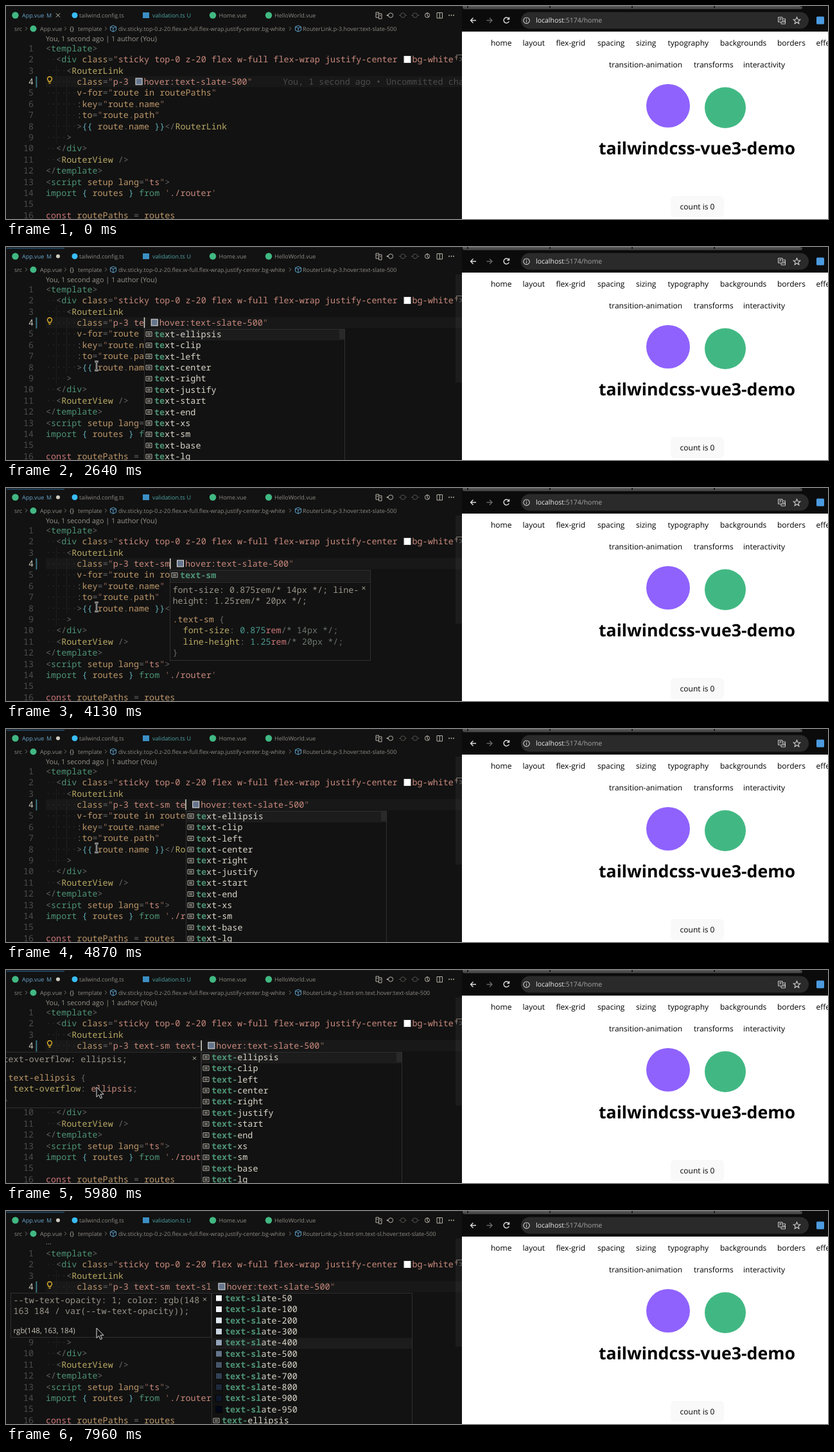
Animation of 1280x333 px, one loop 8000 ms. Source, as an HTML page:

```html
<!DOCTYPE html>
<html lang="en">
<head>
<meta charset="utf-8">
<title>Editor and browser</title>
<style>
html,body{margin:0;width:100%;height:100%;overflow:hidden;background:#121212}
svg{display:block;width:1280px;height:333px}
text{white-space:pre;text-rendering:geometricPrecision}
.m{font-family:"Noto Sans Mono","DejaVu Sans Mono",monospace;font-size:13.43px}
.u{font-family:"Open Sans","Noto Sans",sans-serif}
</style>
</head>
<body>
<svg viewBox="0 0 1280 333">
<g id="editor"></g><g id="edit"></g><g id="popup"></g><g id="mouse"></g><g id="browser"></g>
</svg>
<script>
const LOOP = 8000, CW = 8.06, LH = 17.4, X0 = 62, SPLIT = 710;
const $ = id => document.getElementById(id);
const INK = {p: '#666666', g: '#4d9375', o: '#bd976a', y: '#b8a965', s: '#c98a7d', q: '#8f6659',
  t: '#5eaab5', r: '#cb7676', w: '#dbd7ca', c: '#69736c', n: '#4c9a91', d: '#999489', h: '#4b4b4b'};
const esc = s => s.replace(/&/g, '&amp;').replace(/</g, '&lt;').replace(/>/g, '&gt;');
const row = n => 70.7 + (n - 1) * LH;
const col = n => X0 + n * CW;

const rect = (x, y, w, h, fill, more = '') =>
  `<rect x="${x}" y="${y}" width="${w}" height="${h}" fill="${fill}" ${more}/>`;
const dot = (x, y, r, fill, more = '') => `<circle cx="${x}" cy="${y}" r="${r}" fill="${fill}" ${more}/>`;
const line = (d, stroke, w = 1, more = '') => `<path d="${d}" fill="none" stroke="${stroke}" stroke-width="${w}" ${more}/>`;
const ui = (x, y, s, size, fill, more = '') =>
  `<text class="u" x="${x}" y="${y}" font-size="${size}" fill="${fill}" ${more}>${esc(s)}</text>`;
// Marked-up code: "~" followed by a colour letter starts a run; capitals are bold.
const code = (x, y, src, more = '') => `<text class="m" x="${x}" y="${y}" ${more}>` +
  src.split('~').slice(1).map(t => {
    const k = t[0].toLowerCase(), bold = k !== t[0] ? ' font-weight="700"' : '';
    return `<tspan fill="${INK[k]}"${bold}>${esc(t.slice(1))}</tspan>`;
  }).join('') + '</text>';
const swatch = (x, y, fill, edge = '#e6e6e6') =>
  rect(x + .5, y + .5, 10, 10, fill, `stroke="${edge}" stroke-width="1"`);
const cross = (x, y, r, c) => line(`M${x - r} ${y - r}l${2 * r} ${2 * r}m0 ${-2 * r}l${-2 * r} ${2 * r}`, c);

const LINES = [
  [0, '~p<~gtemplate~p>'],
  [2, '~p<~gdiv ~oclass~p=~q"~ssticky top-0 z-20 flex w-full flex-wrap justify-center'],
  [4, '~p<~yRouterLink'],
  [6, ''],
  [6, '~ov-for~p=~q"~oroute in routePaths~q"'],
  [6, '~p:~okey~p=~q"~oroute~p.~oname~q"'],
  [6, '~p:~oto~p=~q"~oroute~p.~opath~q"'],
  [6, '~p>~t{{ ~oroute~p.~oname ~t}}~p</~yRouterLink'],
  [4, '~p>'],
  [2, '~p</~gdiv~p>'],
  [2, '~p<~yRouterView ~p/>'],
  [0, '~p</~gtemplate~p>'],
  [0, '~p<~gscript ~osetup lang~p=~q"~sts~q"~p>'],
  [0, "~gimport ~t{ ~oroutes ~t} ~gfrom ~q'~s./router~q'"],
  [0, ''],
  [0, '~rconst ~oroutePaths ~p= ~oroutes']
];

function drawEditor() {
  const gray = '#8d8a82', vue = '#41b883';
  let s = rect(0, 0, SPLIT, 333, '#121212') + rect(0, 0, SPLIT, 1, '#1d1d1d');
  s += dot(14.5, 14.5, 5.2, vue) + ui(25, 18, 'App.vue', 9, '#6aa5cc') + ui(63, 18, 'M', 9, '#6aa5cc');
  s += dot(107, 14.5, 4.5, '#38bdf8') + ui(114, 18, 'tailwind.config.ts', 8.9, gray);
  s += rect(213, 10, 10, 9, '#3b8fc4') + ui(228, 18, 'validation.ts', 9, '#4fa3a5') + ui(281.5, 18, 'U', 9, '#4fa3a5');
  s += dot(322, 14.5, 5.2, vue) + ui(331.5, 18, 'Home.vue', 9, gray);
  s += dot(409, 14.5, 5.2, vue) + ui(418, 18, 'HelloWorld.vue', 9, gray);

  const ic = '#b9b5aa', dim = '#55534f';
  s += line('M576 10h4.500v8h-4.500zM580.500 12h4.500v8h-4.500zM577 13h2M582 15h2', ic);
  [[599, ic], [618, dim], [637, dim], [656, ic]].forEach(([x, c]) => s += `<circle cx="${x}" cy="14.500" r="3.600" fill="none" stroke="${c}"/>`);
  s += line('M593 14.500h2.500m-1-1.500l-1.500 1.500l1.500 1.500', ic) + line('M612 14.500h2.500M622 14.500h2M631 14.500h2.500M641 14.500h2.500', dim);
  s += line('M656 10v5l2.500 2', ic) + line('M671 10.500h8.500v8.500h-8.500zM675.300 10.500v8.500', ic);
  [690, 693.5, 697].forEach(x => s += dot(x, 14.5, 1, ic));

  s += ui(13, 38.6, 'src', 9, gray) + dot(42.5, 35.5, 5, vue) + ui(53, 38.6, 'App.vue', 9, gray);
  s += ui(99, 38.6, '{}', 9.5, '#b9b5aa') + ui(112, 38.6, 'template', 9, gray);
  s += ui(175, 38.6, 'div.sticky.top-0.z-20.flex.w-full.flex-wrap.justify-center.bg-white', 8.95, gray);
  [30, 91, 154, 441].forEach(x => s += line(`M${x} 32.500l2.800 2.800l-2.800 2.800`, '#77746d'));
  [167, 455].forEach(x => s += line(`M${x} 30.500l4.500 2v5.500l-4.500 2.200l-4.500-2.200v-5.500zm-4.500 2l4.500 2l4.500-2M${x} 34.500v5.500`, '#5b9fc9'));

  s += rect(X0, 109.6, SPLIT - X0, LH, '#181818');
  s += line('M94.500 110v87', '#202020') + line('M78.500 92.500v122', '#1d1d1d');
  s += rect(46.5, 110, 1.8, 17.4, '#3d7f8c');
  LINES.forEach(([indent, src], i) => {
    const y = row(i + 1);
    s += `<text class="m" x="43" y="${y}" text-anchor="end" fill="${i === 3 ? '#c8c4b8' : '#4c4c4c'}">${i + 1}</text>`;
    for (let c = 0; c < indent; c++) s += dot(col(c + .5), y - 4.5, .7, '#3c3c3c');
    if (src) s += code(col(indent), y, src);
  });
  s += swatch(619.5, 78, '#fff') + code(632.5, row(2), '~sbg-white~q"~p>');
  s += line('M701.500 85v-8.500h9', '#77746d');
  $('editor').innerHTML = s;
}

function drawBrowser() {
  let s = rect(SPLIT, 0, 570, 333, '#fff') + rect(SPLIT, 0, 570, 40, '#0b0b0b');
  s += rect(711, 0, 529, 5, '#454545', 'rx="3"') + rect(711, 0, 525, 2, '#5a5a5a');
  [718, 846, 974, 1102].forEach(x => s += rect(x, 0, 2, 3, '#1a1a1a'));
  s += rect(802, 9.5, 448, 26, '#2a2a2a', 'rx="13"');
  s += line('M732 22.500h-8.500m4-4l-4 4l4 4', '#dedede', 1.4) + line('M748.500 22.500h8.500m-4-4l4 4l-4 4', '#686868', 1.4);
  s += line('M783 20a4.300 4.300 0 1 0 .3 4M783.500 17.500v3.200h-3.200', '#dedede', 1.4);
  s += line('M810.500 18a4.700 4.700 0 1 0 .1 0M810.500 22v3.200M810.500 19.800v1.200', '#c9c9c9', 1.1);
  s += '<text class="u" x="825" y="26.300" font-size="10.500" fill="#f0f0f0">localhost<tspan fill="#a8a8a8">:5174/home</tspan></text>';
  s += line('M1202.500 17.500h6.500v7.500h-6.500zM1209 20h4.500v8h-6.500v-3M1204 20h3.500M1205.800 19v1c0 2-1 3-2 3.500M1210 26l1.500-4l1.500 4', '#c9c9c9');
  s += line('M1231.500 17.500l1.500 3.500l3.800.300l-2.900 2.500l.9 3.700l-3.300-2l-3.300 2l.9-3.700l-2.900-2.500l3.800-.300z', '#d5d5d5', 1.1);
  s += rect(1262, 16.5, 12, 12, '#4c9be0', 'rx="1.5"');
  const nav = {home: 755, layout: 804.5, 'flex-grid': 856.5, spacing: 921, sizing: 981, typography: 1030.5, backgrounds: 1112, borders: 1201, effects: 1261.5};
  for (const k in nav) s += ui(nav[k], 61.8, k, 12, '#000');
  s += ui(939, 96.3, 'transition-animation', 12, '#000') + ui(1071, 96.3, 'transforms', 12, '#000') + ui(1148, 96.3, 'interactivity', 12, '#000');
  s += dot(1031, 156, 34, '#8f62fd') + dot(1120, 159, 32, '#41b883');
  s += ui(1076, 232, 'tailwindcss-vue3-demo', 26.7, '#000', 'font-weight="700" text-anchor="middle"');
  s += rect(1035, 297, 83, 33, '#f9f9f9', 'rx="6"') + ui(1076.5, 317.5, 'count is 0', 12, '#000', 'text-anchor="middle"');
  $('browser').innerHTML = s;
}

const TYPED = [[0, ''], [2290, ' '], [2470, ' t'], [2640, ' te'], [3000, ' tex'], [3230, ' text'], [3660, ' text-'],
  [4130, ' text-sm'], [4510, ' text-sm '], [4870, ' text-sm te'], [5070, ' text-sm tex'], [5260, ' text-sm text'],
  [5980, ' text-sm text-'], [6210, ' text-sm text-s'], [6450, ' text-sm text-sl']];
const PICKED = [[0, 0], [6960, 1], [7130, 2], [7480, 3], [7820, 4]];
const at = (list, t) => list.filter(e => e[0] <= t).pop()[1];

const TEXT = 'ellipsis clip left center right justify start end xs sm base lg'.split(' ').map(s => 'text-' + s);
const SHADES = {50: '248 250 252', 100: '241 245 249', 200: '226 232 240', 300: '203 213 225', 400: '148 163 184',
  500: '100 116 139', 600: '71 85 105', 700: '51 65 85', 800: '30 41 59', 900: '15 23 42', 950: '2 6 23'};
const SLATE = Object.keys(SHADES).map(k => 'text-slate-' + k);
const ANY = 'sr-only not-sr-only pointer-events-none pointer-events-auto visible invisible collapse static fixed absolute relative sticky'.split(' ');
const TABLE = 'table table-caption table-cell table-column table-column-group table-footer-group table-header-group table-row table-row-group table-auto table-fixed touch-auto'.split(' ');

function options(word) {
  if (word === '') return ANY;
  if (word === 't') return TABLE;
  if (word === 'text-sm') return ['text-sm'];
  if (word === 'text-s') return ['text-start', 'text-sm', ...SLATE].slice(0, 12);
  if (word === 'text-sl') return [...SLATE, 'text-ellipsis'];
  return TEXT;
}

const frame = (x, y, w, h) => rect(x + .5, y + .5, w - 1, h, '#121212', 'stroke="#303030"');

function listBox(x, word, picked) {
  const items = options(word), one = items.length === 1;
  let s = frame(x, 128, 313, one ? 19 : 220);
  s += rect(x + 1, 129 + picked * LH, 311, 17, '#1c1c1c');
  if (items === TEXT) s += rect(x + 304, 129, 8, 15, '#292929');
  items.forEach((name, i) => {
    const y = 140.7 + i * LH, shade = SHADES[name.split('slate-')[1]];
    if (shade) s += swatch(x + 6, y - 10, `rgb(${shade.replace(/ /g, ',')})`, '#050505');
    else s += line(`M${x + 3} ${y - 8}h9v7h-9zm2 2.500h5m-5 2h5`, '#b9b5aa', 1, 'stroke-linejoin="round"');
    let n = 0;
    while (n < word.length && name[n] === word[n]) n++;
    s += code(x + (shade ? 21 : 16), y, `~G${name.slice(0, n)}~w${name.slice(n)}`);
  });
  return s;
}

function docBox(x, word, picked) {
  if (word === 'text-sm') {
    const size = (k, v, px) => `~y  ${k}~p: ~n${v}~rrem~c/* ${px}px */~p;`;
    return frame(x, 147, 313, 122) + cross(x + 302, 156.5, 2.4, '#c8c4b8') +
      code(x + 4.5, 163.5, '~dfont-size: 0.875rem/* 14px */; line-') + code(x + 4.5, 180.9, '~dheight: 1.25rem/* 20px */;') +
      code(x + 4.5, 209.7, '~o.text-sm ~p{') + code(x + 4.5, 227.1, size('font-size', '0.875', 14)) +
      code(x + 4.5, 244.5, size('line-height', '1.25', 20)) + code(x + 4.5, 261.9, '~p}');
  }
  const left = x - 313, tx = left + 4.5, close = cross(x - 10.5, 138, 2.4, '#c8c4b8');
  if (word === 'text-sl') {
    const rgb = Object.values(SHADES)[picked].split(' ');
    return frame(left, 128, 313, 69) + close +
      code(tx, 143.5, `~d--tw-text-opacity: 1; color: rgb(${rgb[0]}`) +
      code(tx, 160.9, `~d${rgb[1]} ${rgb[2]} / var(--tw-text-opacity));`) +
      ui(tx, 191, `rgb(${rgb.join(', ')})`, 11.6, '#c8c4b8');
  }
  const name = options(word)[0].slice(5), prop = name === 'start' ? 'text-align' : 'text-overflow';
  return frame(left, 128, 313, 87) + close + code(tx, 143.5, `~d${prop}: ${name};`) +
    code(tx, 172.7, `~o.text-${name} ~p{`) + code(tx, 190.1, `~y  ${prop}~p: ~s${name}~p;`) + code(tx, 207.5, '~p}');
}

function drawEdit(t, typed, picked) {
  const dirty = t >= 2290, end = 16 + typed.length, after = col(end + 1);
  let s = dirty ? dot(81, 14.5, 3, '#d0ccc0') + rect(1, 1.5, 90, 1, '#2f6f9c') : cross(81, 14.5, 3, '#c8c4b8');
  const crumb = t < 5820 ? '' : t < 6790 ? '.text-sm.text' : '.text-sm.text-sl';
  s += ui(462, 38.6, `RouterLink.p-3${crumb}.hover:text-slate-500`, 8.95, '#8d8a82');
  s += t < 6790 ? ui(62, 55, 'You, 1 second ago | 1 author (You)', 10.8, '#99958b') : ui(62, 51.5, '…', 11, '#99958b');
  s += code(col(6), row(4), `~oclass~p=~q"~sp-3${typed}`);
  s += swatch(after + 2.5, 112.5, '#64748b') + code(after + 15.5, row(4), '~shover:text-slate-500~q"');
  if (!dirty) s += code(431, row(4), '~hYou, 1 second ago • Uncommitted changes');
  if (t < 4130 || t >= 5820) s += line('M66.300 118c0-1.300-1.800-2-1.800-4a3.500 3.500 0 0 1 7 0c0 2-1.800 2.700-1.800 4zM66.500 120.500h3', '#e8b72c', 1.3);
  if (dirty && t < 7960) s += rect(col(end) - .4, 110, 1.5, 16.5, '#dbd7ca');
  // The scrollbar shows once the pointer is over the editor.
  if (t >= 70) s += rect(700, 43, 10, 169, '#fff', 'opacity=".045"');
  $('edit').innerHTML = s;
}

function pointer(t) {
  if (t < 70) return null;
  if (t < 1140) {
    const k = Math.min(6, Math.floor((t - 70) / 155)) / 7;
    return [690 - 513 * k, 90 + 8 * k];
  }
  const k = Math.min(5, Math.floor((t - 1108) / 202)) / 5, j = 1 - k;
  return [177 * j * j + 408 * j * k + 141 * k * k, 98 * j * j + 264 * j * k + 186 * k * k];
}

function drawMouse(p, arrow) {
  if (!p) return '';
  const [x, y] = p;
  if (arrow) return `<path d="M${x} ${y - 3}v15.500l3.600-3.300l2.500 5.600l2.500-1.100l-2.500-5.500h4.900z" fill="#111" stroke="#ddd"/>`;
  const d = `M${x - 3} ${y - 7}h2l1 1l1-1h2m-3 1v12m-3 1h2l1-1l1 1h2`;
  return line(d, '#e4e4e4', 2.4) + line(d, '#111', .9);
}

let last = '';
function render(t) {
  const typed = at(TYPED, t), picked = at(PICKED, t), p = pointer(t);
  const key = [typed, picked, p, t < 5820, t < 6790, t < 7960].join();
  if (key === last) return;
  last = key;
  const word = typed.split(' ').pop(), x = Math.round(col(16 + typed.length));
  const docs = word === 'text-sm' || t >= 5260;
  drawEdit(t, typed, picked);
  $('popup').innerHTML = typed ? (docs ? docBox(x, word, picked) : '') + listBox(x, word, picked) : '';
  $('mouse').innerHTML = drawMouse(p, t >= 5260);
}

drawEditor();
drawBrowser();
const start = performance.now();
function tick() {
  render((performance.now() - start) % LOOP);
  requestAnimationFrame(tick);
}
render(0);
requestAnimationFrame(tick);
</script>
</body>
</html>
```
